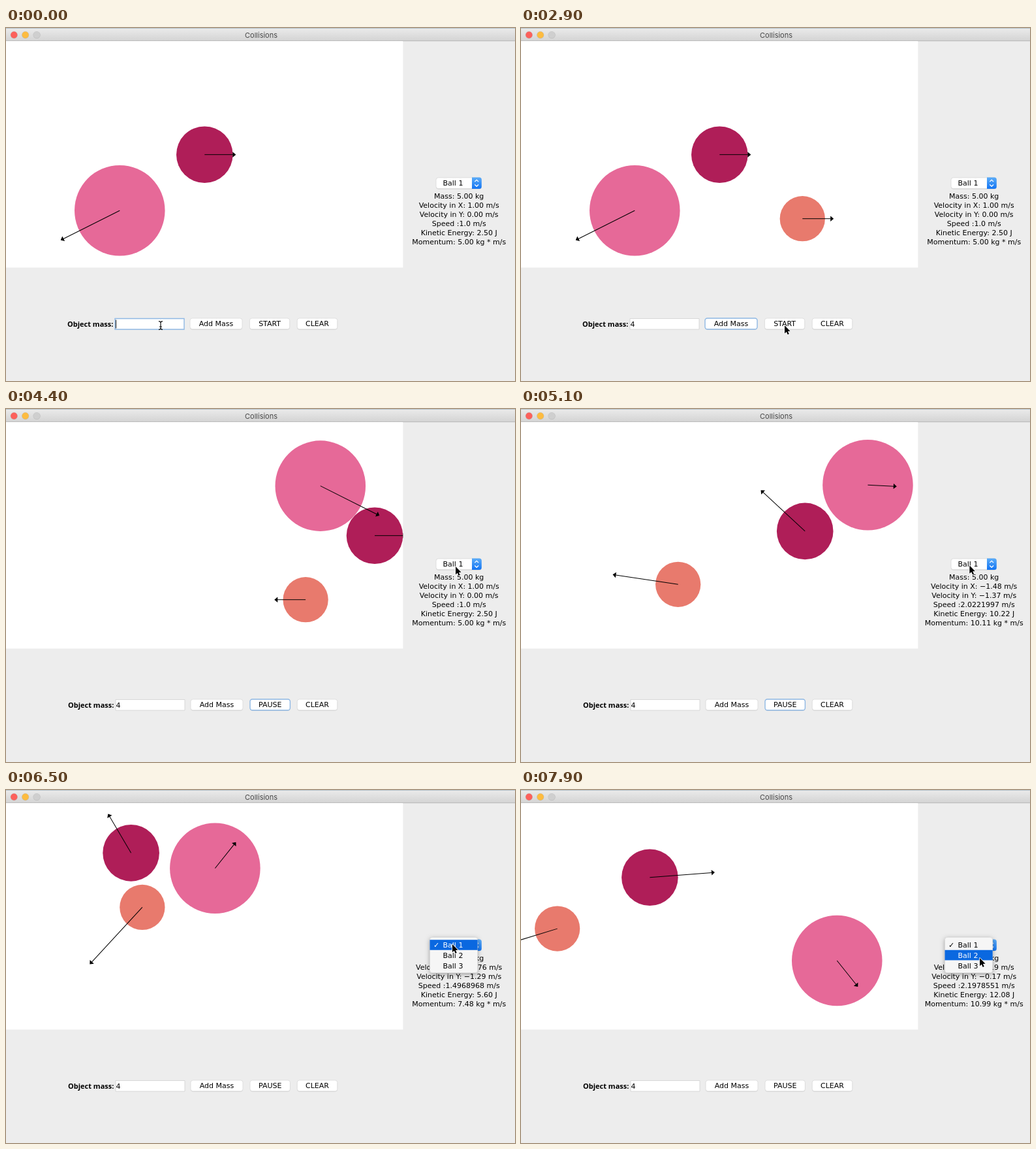
These frames come from a looping animation (780 by 540 pixels, 8 s). An HTML page with a canvas:

```html
<!DOCTYPE html>
<html lang="en">
<head>
<meta charset="utf-8">
<title>Collisions</title>
<style>
html, body { margin: 0; width: 100%; height: 100%; overflow: hidden; background: #ededed; }
canvas { display: block; }
</style>
</head>
<body>
<canvas id="stage" width="780" height="540"></canvas>
<script>
const ctx = document.getElementById('stage').getContext('2d');
const LOOP = 8000, STEP = 100;
const ADD = 1600, START = 3035, MENU = 6500;
const UNIT = 8.66;           // radius per kilogram
const ARROW = UNIT * 5;      // arrow length per m/s
const ARENA = { left: 0, top: 20, right: 608, bottom: 366.7 };
const SLACK = 1.5;           // how far a ball sinks into a wall
const SANS = '11px "DejaVu Sans", sans-serif';
const FOCUS = '#8fb8e4';

// Hits between balls: simulation time, x, y. The coordinates run on
// through the walls; fold() mirrors them back into the arena.
const balls = [
  { mass: 5, color: '#af1e58', from: 0, hits: [
    [0, 304, 193.5], [261, 565, 193.5], [316, 474, 323.2],
    [380, 456.3, 206.5], [549, 205.5, -25.65], [660, 192.7, 98.5],
    [781.7, 100.3, -58.5], [883, 147.1, 137.4], [906, 197.5, 133.5]] },
  { mass: 8, color: '#e66998', from: 0, hits: [
    [0, 174, 279], [261, -346.5, 540], [380, -382.4, 482.5],
    [652, -631.4, 470.1], [906, -460.8, 683.2]] },
  { mass: 4, color: '#e87a6d', from: ADD, hits: [
    [0, 431, 291.5], [324, 754, 291.5], [549, 1250.3, 216.8], [656, 1302.4, 499.1],
    [781.7, 1077.8, 256.3], [883, 1051.2, 468.4], [906, 1094.7, 455.1]] }
];

// Pointer stops: ms, x, y.
const pointer = [
  [0, 237, 455], [600, 237, 455], [1000, 322, 453], [1500, 430, 290], [1700, 430, 290],
  [2700, 404, 455], [3050, 404, 455], [3600, 644, 265], [4400, 689, 241],
  [MENU, 684, 236], [7000, 699, 267], [7900, 703, 257]
];

// The simulation runs a little slower while the menu is open at the end.
const simTime = ms =>
  Math.max(0, (Math.min(ms, 7000) - START) * 0.191 + Math.max(0, ms - 7000) * 0.165);

function locate(list, t) {
  let i = 1;
  while (i < list.length - 1 && t > list[i][0]) i++;
  const [t0, x0, y0] = list[i - 1], [t1, x1, y1] = list[i];
  const vx = (x1 - x0) / (t1 - t0), vy = (y1 - y0) / (t1 - t0);
  const dt = Math.min(t, t1) - t0;
  return { x: x0 + vx * dt, y: y0 + vy * dt, vx, vy };
}

function fold(v, lo, hi) {
  const w = hi - lo, u = (((v - lo) % (2 * w)) + 2 * w) % (2 * w);
  return u <= w ? [lo + u, 1] : [lo + 2 * w - u, -1];
}

function state(ball, sim) {
  const p = locate(ball.hits, sim), inset = ball.mass * UNIT - SLACK;
  const [x, sx] = fold(p.x, ARENA.left + inset, ARENA.right - inset);
  const [y, sy] = fold(p.y, ARENA.top + inset, ARENA.bottom - inset);
  return { x, y, vx: p.vx * sx, vy: p.vy * sy };
}

function text(str, x, y, align = 'left', font = SANS, color = '#000') {
  ctx.font = font;
  ctx.textAlign = align;
  ctx.fillStyle = color;
  ctx.fillText(str, x, y);
}

function rect(x, y, w, h, fill) {
  ctx.fillStyle = fill;
  ctx.fillRect(x, y, w, h);
}

function box(x, y, w, h, r, fill, stroke, width = 1) {
  ctx.beginPath();
  ctx.roundRect(x, y, w, h, r);
  ctx.fillStyle = fill;
  ctx.fill();
  if (!stroke) return;
  ctx.strokeStyle = stroke;
  ctx.lineWidth = width;
  ctx.stroke();
}

function disc(x, y, r, fill) {
  ctx.beginPath();
  ctx.arc(x, y, r, 0, Math.PI * 2);
  ctx.fillStyle = fill;
  ctx.fill();
}

function shape(points) {
  ctx.beginPath();
  points.forEach(([x, y]) => ctx.lineTo(x, y));
  ctx.closePath();
}

function fade(top, bottom, from, to) {
  const g = ctx.createLinearGradient(0, top, 0, bottom);
  g.addColorStop(0, from);
  g.addColorStop(1, to);
  return g;
}

function titleBar() {
  rect(0, 0, 780, 20, fade(0, 20, '#ebebeb', '#d3d3d3'));
  rect(0, 0, 780, 0.7, '#9fb2be');
  rect(0, 19.3, 780, 0.9, '#b4b4b4');
  ['#fc605b', '#fdbc40', '#cfcfcf'].forEach((color, i) => {
    const x = 12.3 + i * 17.4;
    disc(x, 10.6, 5.6, 'rgba(0,0,0,.14)');
    disc(x, 10.6, 5.1, color);
  });
  text('Collisions', 391, 15, 'center', '11px Inter, sans-serif', '#484848');
}

function drawBall(ball, sim) {
  const { x, y, vx, vy } = state(ball, sim);
  const len = Math.hypot(vx, vy) * ARROW;
  disc(x + 0.3, y + 0.2, ball.mass * UNIT, ball.color);
  ctx.save();
  ctx.translate(x + 0.3, y + 0.2);
  ctx.rotate(Math.atan2(vy, vx));
  ctx.strokeStyle = ctx.fillStyle = '#000';
  ctx.lineWidth = 1;
  ctx.beginPath();
  ctx.moveTo(0, 0);
  ctx.lineTo(len, 0);
  ctx.stroke();
  shape([[len - 0.3, -4.2], [len + 4.7, 0], [len - 0.3, 4.2]]);
  ctx.fill();
  ctx.restore();
}

function arena(ms, sim) {
  const { left, top, right, bottom } = ARENA;
  ctx.save();
  ctx.beginPath();
  ctx.rect(left, top, right - left + 0.3, bottom - top);
  ctx.clip();
  rect(left, top, right - left + 1, bottom - top, '#fff');
  balls.forEach(b => { if (ms >= b.from) drawBall(b, sim); });
  ctx.restore();
}

function button(label, x, w, focus) {
  box(x, 444.6, w, 17, 3.5, 'rgba(0,0,0,.13)');
  box(x, 444, w, 16.8, 3.5, '#fff', focus ? FOCUS : '#d6d6d6', focus ? 1.4 : 0.7);
  text(label, x + w / 2, 456.3, 'center');
}

function controls(ms) {
  const running = ms >= START - 35;
  const shift = running ? 1 : 0;
  const focus = ms < 1000 ? 'field' : !running ? 'add' : ms < MENU ? 'run' : 'menu';
  const typed = ms >= 500, editing = focus === 'field';
  text('Object mass:', 94 + shift, 457, 'left', 'bold 11px "Open Sans", sans-serif');
  box(167 + shift, 444.5, 106, 16.5, 0, '#fff', editing ? FOCUS : '#d0d0d0', editing ? 1.4 : 0.8);
  if (typed) text('4', 167.6 + shift, 457);
  if (editing) rect(typed ? 175 : 168, 446.5, 1, 13, '#111');
  button('Add Mass', 282 + shift, 80, focus === 'add');
  button(running ? 'PAUSE' : 'START', 373.4 + shift * 0.6, 61.4, focus === 'run');
  button('CLEAR', 446.2, 61.6, false);
}

function selector() {
  box(659, 229.4, 69.6, 17, 3.5, 'rgba(0,0,0,.14)');
  box(659, 228.9, 69.6, 16.8, 3.5, '#fff', '#d4d4d4', 0.7);
  box(714, 228.6, 14.8, 17.4, [0, 3.5, 3.5, 0], fade(229, 246, '#5aabf8', '#1274f3'));
  ctx.strokeStyle = '#fff';
  ctx.lineWidth = 1.3;
  for (const s of [-1, 1]) {
    ctx.beginPath();
    ctx.moveTo(718.3, 237.3 + s * 2.2);
    ctx.lineTo(721.2, 237.3 + s * 5);
    ctx.lineTo(724.1, 237.3 + s * 2.2);
    ctx.stroke();
  }
  text('Ball 1', 669.5, 241.3);
}

function readout(sim) {
  const { mass } = balls[0];
  const { vx, vy } = state(balls[0], sim);
  const speed = Math.hypot(vx, vy);
  const num = v => v.toFixed(2).replace('-', '\u2212');
  const long = Number.isInteger(speed) ? speed.toFixed(1) : speed.toPrecision(8);
  [
    `Mass: ${num(mass)} kg`,
    `Velocity in X: ${num(vx)} m/s`,
    `Velocity in Y: ${num(vy)} m/s`,
    `Speed :${long} m/s`,
    `Kinetic Energy: ${num(mass * speed * speed / 2)} J`,
    `Momentum: ${num(mass * speed)} kg * m/s`
  ].forEach((line, i) => text(line, 694.2, 261.3 + i * 13.9, 'center'));
}

function menu(y) {
  const left = 649.5, top = 229.2, w = 73.2, row = 15.6;
  ctx.save();
  ctx.shadowColor = 'rgba(0,0,0,.35)';
  ctx.shadowBlur = 7;
  ctx.shadowOffsetY = 2;
  box(left, top - 3.9, w, 54.4, 3.5, '#f6f6f6');
  ctx.restore();
  box(left, top - 3.9, w, 54.4, 3.5, '#f6f6f6', '#c4c4c4', 0.5);
  const hot = Math.max(0, Math.min(2, Math.floor((y - top) / row)));
  rect(left, top + hot * row, w, row, '#0a68e0');
  for (let i = 0; i < 3; i++) {
    const color = i === hot ? '#fff' : '#000';
    const base = top + 12.1 + i * row;
    text('Ball ' + (i + 1), 669.5, base, 'left', SANS, color);
    if (i === 0) text('\u2713', 655, base, 'left', SANS, color);
  }
}

function drawPointer(x, y) {
  const overField = x > 167 && x < 274 && y > 444 && y < 462;
  ctx.save();
  ctx.translate(x, y);
  ctx.lineJoin = 'round';
  if (overField) {
    ctx.strokeStyle = '#111';
    ctx.lineWidth = 1.2;
    ctx.beginPath();
    for (const s of [-1, 1]) {
      ctx.moveTo(-3, s * 6.3);
      ctx.quadraticCurveTo(0, s * 6.3, 0, s * 4);
      ctx.quadraticCurveTo(0, s * 6.3, 3, s * 6.3);
    }
    ctx.moveTo(0, -5);
    ctx.lineTo(0, 5);
    ctx.moveTo(-2, 2);
    ctx.lineTo(2, 2);
    ctx.stroke();
  } else {
    shape([[0, 0], [0, 12.3], [2.8, 9.8], [4.7, 14], [6.8, 13.1], [4.9, 9], [8.6, 8.8]]);
    ctx.strokeStyle = '#fff';
    ctx.lineWidth = 1.6;
    ctx.stroke();
    ctx.fillStyle = '#000';
    ctx.fill();
  }
  ctx.restore();
}

function draw(ms) {
  const sim = simTime(ms), p = locate(pointer, ms);
  rect(0, 0, 780, 540, '#ededed');
  titleBar();
  arena(ms, sim);
  controls(ms);
  selector();
  readout(sim);
  if (ms >= MENU) menu(p.y);
  drawPointer(p.x, p.y);
}

const begin = performance.now();
function tick() {
  const ms = (performance.now() - begin) % LOOP;
  draw(Math.floor(ms / STEP) * STEP);
  requestAnimationFrame(tick);
}
tick();
</script>
</body>
</html>
```
